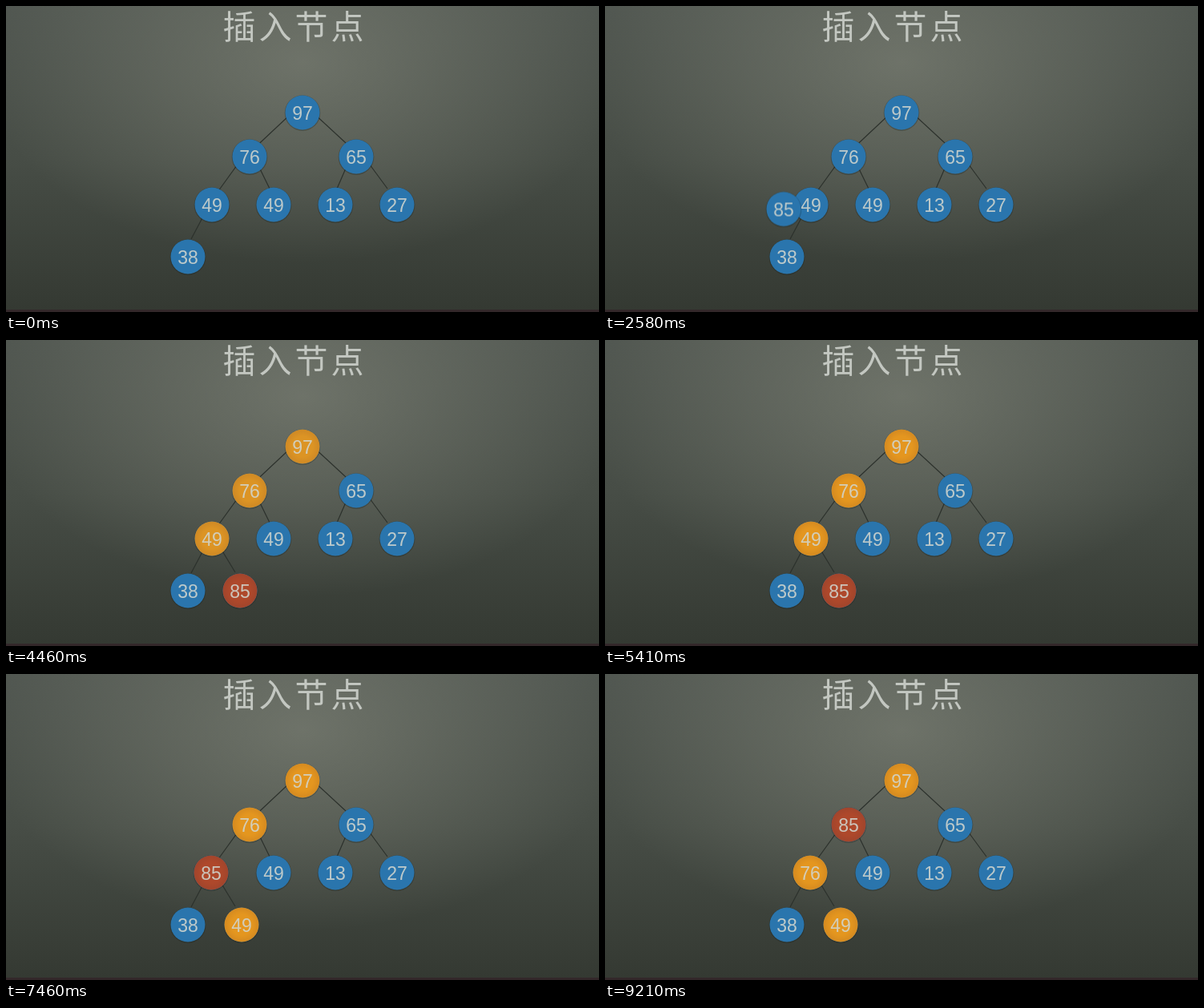
An HTML page that plays this animation: 740x382 px, repeating every 9240 ms.

```html
<!DOCTYPE html>
<html lang="zh">
<head>
<meta charset="utf-8">
<title>插入节点</title>
<style>
  html, body { margin: 0; width: 100%; height: 100%; overflow: hidden; background: #434942; }
  svg { display: block; width: 740px; height: 382px; }
  .title {
    font: 300 41px "Noto Sans CJK SC", "Noto Sans CJK", "Noto Sans", sans-serif;
    fill: #c3c7c1; text-anchor: middle;
  }
  .node text {
    font: 23px "Liberation Sans", Arial, sans-serif;
    fill: #d0d5ce; fill-opacity: .88; text-anchor: middle;
  }
  .node circle { fill: #2a75ad; }
  .node .shade { fill: #141a18; opacity: .28; }
  .node .orange { fill: url(#amber); }
  .node .red { fill: url(#rust); }
  .edges { fill: none; stroke: #2c312c; stroke-width: 1.2; }

  .orange, .red, .n85, .n76, .n49, .new-edge {
    animation: 9240ms linear infinite both;
  }
  .orange { animation-name: warm; }
  .red { animation-name: mark; }
  .new-edge { animation-name: link; }
  .n85 { animation-name: insert; }
  .n76 { animation-name: sink76; }
  .n49 { animation-name: sink49; }

  @keyframes mark { 0%, 40.26% { opacity: 0 } 43.5%, 100% { opacity: 1 } }
  @keyframes warm { 0%, 43.07% { opacity: 0 } 48.48%, 100% { opacity: 1 } }
  @keyframes link { 0%, 31.93% { opacity: 0 } 35.17%, 100% { opacity: 1 } }
  @keyframes insert {
    0%, 4.33% { opacity: 0; transform: translate(83px, 133px) }
    9.74% { opacity: 1; transform: translate(83px, 133px) }
    22.73% { transform: translate(83px, 133px); animation-timing-function: ease-in-out }
    31.39% { transform: translate(292px, 313px) }
    64.07% { transform: translate(292px, 313px); animation-timing-function: ease-in-out }
    71.43% { transform: translate(256px, 248px) }
    84.42% { transform: translate(256px, 248px); animation-timing-function: ease-in-out }
    91.99%, 100% { opacity: 1; transform: translate(304px, 188px) }
  }
  @keyframes sink49 {
    0% { transform: translate(257px, 248px) }
    64.07% { transform: translate(257px, 248px); animation-timing-function: ease-in-out }
    71.43%, 100% { transform: translate(294px, 313px) }
  }
  @keyframes sink76 {
    0% { transform: translate(304px, 188px) }
    84.42% { transform: translate(304px, 188px); animation-timing-function: ease-in-out }
    91.99%, 100% { transform: translate(256px, 248px) }
  }
</style>
</head>
<body>
<svg viewBox="0 0 740 382">
  <defs>
    <linearGradient id="base" x2="0" y2="1">
      <stop offset="0" stop-color="#505650"/>
      <stop offset=".5" stop-color="#474d46"/>
      <stop offset="1" stop-color="#343932"/>
    </linearGradient>
    <radialGradient id="glow">
      <stop offset="0" stop-color="#82867a" stop-opacity=".62"/>
      <stop offset=".45" stop-color="#82867a" stop-opacity=".34"/>
      <stop offset="1" stop-color="#82867a" stop-opacity="0"/>
    </radialGradient>
    <radialGradient id="amber">
      <stop offset=".6" stop-color="#e4961f"/>
      <stop offset="1" stop-color="#d58a20"/>
    </radialGradient>
    <radialGradient id="rust">
      <stop offset=".6" stop-color="#ae482b"/>
      <stop offset="1" stop-color="#a1452c"/>
    </radialGradient>
  </defs>

  <rect width="740" height="382" fill="url(#base)"/>
  <ellipse cx="370" cy="70" rx="400" ry="250" fill="url(#glow)"/>
  <rect y="379" width="740" height="3" fill="#33282a"/>

  <text class="title" x="291 336 381 426" y="41">插入节点</text>

  <g class="edges">
    <path d="M304 183L370 121L437 183"/>
    <path d="M257 242L304 177L329 228"/>
    <path d="M413 228L433 182M437 175L476 228"/>
    <path d="M231 291L257 242"/>
    <path class="new-edge" d="M257 242L286 290"/>
  </g>

  <g id="nodes"></g>
</svg>
<script>
  // value, optional tint, optional fixed position
  const nodes = [
    [97, "orange", 370, 133], [65, "", 437, 188], [49, "", 334, 248],
    [13, "", 411, 248], [27, "", 488, 248], [38, "", 227, 313],
    [49, "orange"], [76, "orange"], [85, "red"]
  ];

  function drawNode([value, tint, x, y]) {
    const fixed = x !== undefined;
    const place = fixed ? `transform="translate(${x} ${y})"` : "";
    const overlay = tint ? `<circle class="${tint}" r="21.5"/>` : "";
    return `<g class="node ${fixed ? "" : "n" + value}" ${place}>
      <circle class="shade" cy=".6" r="22.3"/><circle r="21.5"/>${overlay}
      <text y="8.5">${value}</text></g>`;
  }

  document.getElementById("nodes").innerHTML = nodes.map(drawNode).join("");
</script>
</body>
</html>
```
